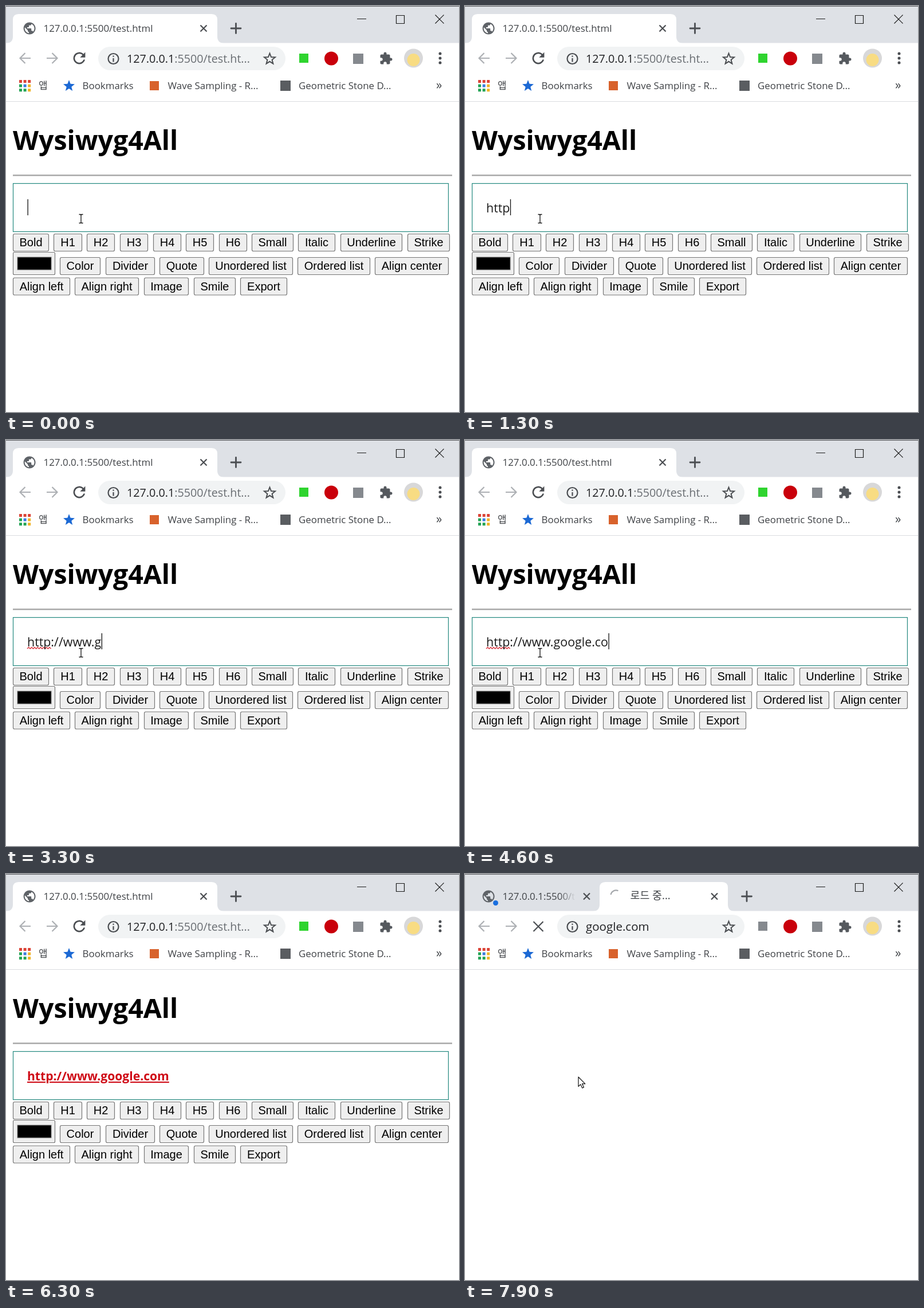
Recreate the animation shown at these times as an HTML page. Size 791 by 708 pixels, loop 8 s.

```html
<!DOCTYPE html>
<html lang="ko">
<head>
<meta charset="utf-8">
<style>
html, body { margin: 0; width: 100%; height: 100%; overflow: hidden; background: #fff; }
svg { display: block; width: 791px; height: 708px; font-family: "Open Sans", "Noto Sans", "Noto Sans CJK KR", "Noto Sans CJK", sans-serif; }
.ui { font-size: 16.9px; fill: #3f4246; }
.url { font-size: 19.7px; fill: #202124; }
.edit { font-size: 21.4px; fill: #1c1c1c; white-space: pre; }
.link { font-size: 21.1px; font-weight: 700; fill: #cf0a16; text-decoration: underline; }
.btn { font: 20px "Liberation Sans", Arial, sans-serif; text-anchor: middle; }
.line { fill: none; stroke: #4b4e52; stroke-width: 2.2; }
.cursor { fill: #fff; stroke: #111; stroke-width: 1.2; stroke-linejoin: round; }
</style>
</head>
<body>
<svg id="stage" viewBox="0 0 791 708">
  <defs>
    <linearGradient id="fade" gradientUnits="userSpaceOnUse" x1="165" x2="193">
      <stop stop-color="#3f4246"/><stop offset="1" stop-color="#3f4246" stop-opacity="0"/>
    </linearGradient>
    <path id="globe" fill="#5f6368" transform="translate(28.5 26.5) scale(1.05)" d="M12 2C6.48 2 2 6.48 2 12s4.48 10 10 10 10-4.48 10-10S17.52 2 12 2zm-1 17.93c-3.95-.49-7-3.85-7-7.93 0-.62.08-1.21.21-1.79L9 15v1c0 1.1.9 2 2 2v1.93zm6.9-2.54c-.26-.81-1-1.39-1.9-1.39h-1v-3c0-.55-.45-1-1-1H8v-2h2c.55 0 1-.45 1-1V7h2c1.1 0 2-.9 2-2v-.41c2.93 1.19 5 4.06 5 7.41 0 2.08-.8 3.97-2.1 5.39z"/>
  </defs>
  <rect width="791" height="708" fill="#fff"/>
  <rect width="791" height="64.5" fill="#dee1e6"/>
  <rect width="791" height="1" fill="#5c5e61"/>
  <path d="M613 22.5h16M681.5 16.5h14v14h-14zM749.5 15.5l15 15m0-15l-15 15" fill="none" stroke="#1c1c1c" stroke-width="1.2"/>
  <rect x="161" y="71" width="327" height="41" rx="20.5" fill="#f1f3f4"/>
  <path class="line" style="stroke:#adb0b4" d="M43 91H25m8.5-9l-9 9 9 9M71 91h18m-8.5-9l9 9-9 9"/>
  <circle class="line" cx="187.5" cy="92" r="9"/>
  <path class="line" d="M187.5 86.5v2.3m0 2.2v6.5"/>
  <rect x="0" y="166" width="791" height="1" fill="#dadce0"/>

  <!-- toolbar and bookmarks -->
  <g id="bar">
    <circle cx="568" cy="91.5" r="12" fill="#c9000b"/>
    <rect x="606" y="83" width="18" height="18" fill="#85898e"/>
    <path fill="#55595e" transform="translate(651.5 79.5)" d="M20.5 11H19V7c0-1.1-.9-2-2-2h-4V3.5a2.5 2.5 0 0 0-5 0V5H4c-1.1 0-2 .9-2 2v3.8h1.5a2.7 2.7 0 0 1 0 5.4H2V20c0 1.1.9 2 2 2h3.8v-1.5a2.7 2.7 0 0 1 5.4 0V22H17c1.1 0 2-.9 2-2v-4h1.5a2.5 2.5 0 0 0 0-5z"/>
    <circle cx="711.5" cy="91" r="16.5" fill="#d8d8d9"/>
    <circle cx="711.5" cy="94" r="11" fill="#f8dc83"/>
    <path d="M758 83v0m0 8v0m0 8v0" stroke="#4b4e52" stroke-width="5" stroke-linecap="round"/>
    <rect x="251" y="131" width="16" height="16" fill="#d8622c"/>
    <rect x="479" y="130" width="18" height="18" fill="#5a5d61"/>
    <text class="ui" x="57" y="144.5">앱</text>
    <text class="ui" x="133.5" y="145">Bookmarks</text>
    <text class="ui" x="282.5" y="145">Wave Sampling - R...</text>
    <text class="ui" x="511" y="145">Geometric Stone D...</text>
    <text class="ui" x="751" y="145" style="font-size:21px">»</text>
  </g>

  <g id="home">
    <path id="homeTab" fill="#fff"/>
    <use href="#globe"/>
    <text class="ui" x="65.5" y="45">127.0.0.1:5500/test.html</text>
    <path class="line" d="M339.5 33.5l11 11m0-11l-11 11"/>
    <path class="line" stroke-linecap="round" style="stroke-width:2.8" d="M393 39h17m-8.5-8.5v17"/>
    <path fill="#4b4e52" transform="translate(112.4 75.4) scale(1.3)" d="M17.65 6.35A8 8 0 1 0 19.73 14h-2.08A6 6 0 1 1 12 6c1.66 0 3.14.69 4.22 1.78L13 11h7V4z"/>
    <text class="url" x="211" y="99">127.0.0.1<tspan fill="#6a6e73">:5500/test.ht...</tspan></text>
    <rect x="512" y="83" width="16" height="16" fill="#2fd42f"/>
    <text x="12" y="250.5" font-size="46.5" font-weight="700">Wysiwyg4All</text>
    <path d="M12 295h767" stroke="#8e8e8e" stroke-width="1.4"/>
    <path d="M12 296.5h767" stroke="#d0d0d0"/>
    <rect x="12.5" y="309.5" width="760" height="84" fill="#fff" stroke="#23897f" stroke-width="1.2"/>
    <g id="buttons"></g>
    <rect x="12.5" y="429.5" width="73" height="39" rx="2" fill="#efefef" stroke="#767676" stroke-width="1.2"/>
    <rect x="20" y="438" width="59" height="22" stroke="#767676"/>
    <path id="squiggle" fill="none" stroke="#d8323c" stroke-width="1.4"/>
    <text class="edit" id="typed" x="37" y="360"></text>
    <rect id="caret" y="337" width="1.3" height="28" fill="#111"/>
    <text class="link" id="link" x="37" y="360">http://www.google.com</text>
  </g>

  <g id="load">
    <path id="loadTab" fill="#fff"/>
    <use href="#globe"/>
    <circle cx="53.5" cy="50.5" r="4.5" fill="#1a6fdf"/>
    <text class="ui" x="65.5" y="45" style="fill:url(#fade)">127.0.0.1:5500/t</text>
    <path id="spinner" class="line" style="stroke:#a4a7ab" d="M254.5 36A9.5 9.5 0 0 1 267.5 29.2"/>
    <text class="ui" x="288.5" y="44" style="font-size:18.4px">로드 중...</text>
    <path class="line" d="M207 33.5l11 11m0-11l-11 11M430 33.5l11 11m0-11l-11 11M119.5 83l17 17m0-17l-17 17"/>
    <path class="line" stroke-linecap="round" style="stroke-width:2.8" d="M483.5 39h17m-8.5-8.5v17"/>
    <text class="url" x="211" y="99" style="font-size:20.5px">google.com</text>
    <rect x="512" y="83" width="16" height="16" fill="#85898e"/>
  </g>

  <g id="ibeam"><path d="M-3.5-7.5h2.5l1 1 1-1h2.5M0-6.5v13M-3.5 7.5h2.5l1-1 1 1h2.5" fill="none" stroke="#111" stroke-width="1.3"/></g>
  <g id="arrow"><path class="cursor" d="M0 0v16.5l3.8-3.6 3 6.3 2.7-1.3-2.9-6h5.2z"/></g>
  <g id="hand"><path class="cursor" d="M-2 14V2q0-2 2-2t2 2v6q0-1.5 1.7-1.3T5.5 8.500q.3-1.3 1.9-1t1.6 2q2-1 2.3 1v5q0 3.5-2.500 5.500v2.500H-1v-2.500L-6.500 14q-1-2.500 1.300-2.500 1.500.3 3.200 2.500M2 8v5M5.500 8.500V13M9 9.500V13"/></g>
</svg>
<script>
const $ = id => document.getElementById(id);
const show = (id, on) => $(id).style.display = on ? "" : "none";
const add = (id, markup) => $(id).insertAdjacentHTML("beforeend", markup);

const tabPath = (a, b) =>
  `M${a - 12} 65q12 0 12-12V24q0-10 10-10H${b - 10}q10 0 10 10V53q0 12 12 12z`;
$("homeTab").setAttribute("d", tabPath(12, 369));
$("loadTab").setAttribute("d", tabPath(235, 459));

function star(x, y, r, style) {
  const pts = Array.from({ length: 10 }, (_, i) => {
    const a = (i * 36 - 90) * Math.PI / 180, d = i % 2 ? r * 0.43 : r;
    return [x + d * Math.cos(a), y + d * Math.sin(a)];
  });
  add("bar", `<polygon points="${pts}" ${style}/>`);
}
star(460.5, 92.5, 10, 'fill="none" stroke="#4b4e52" stroke-width="2"');
star(110, 139.5, 10.5, 'fill="#1c69d4"');

const [red, green, blue, yellow] = ["#db4437", "#23a455", "#3b7de0", "#f0b429"];
[red, red, red, green, blue, yellow, green, green, yellow].forEach((c, i) =>
  add("bar", `<rect x="${23 + i % 3 * 7.6}" y="${129 + (i / 3 | 0) * 7.6}" width="5" height="5" fill="${c}"/>`));

// Each button: label, left edge, right edge
const rows = [
  [397, "Bold,12,75 H1,83,133 H2,141,190 H3,199,248 H4,257,306 H5,314,363 H6,372,421 Small,429,502 Italic,510,575 Underline,584,692 Strike,701,775"],
  [438, "Color,94,165 Divider,174,260 Quote,268,346 Unordered_list,354,501 Ordered_list,509,636 Align_center,644,773"],
  [473.5, "Align_left,12,112 Align_right,120,232 Image,241,319 Smile,328,401 Export,409,491"]
];
for (const [y, row] of rows)
  for (const spec of row.split(" ")) {
    const [label, a, b] = spec.split(",");
    add("buttons", `<rect x="${+a + .5}" y="${y + .5}" width="${b - a - 1}" height="30" rx="2.5" fill="#efefef" stroke="#767676" stroke-width="1.2"/>
      <text class="btn" x="${(+a + +b) / 2}" y="${y + 22}">${label.replace("_", " ")}</text>`);
  }

let zigzag = "M37 364";
for (let i = 1; i <= 16; i++) zigzag += `L${37 + i * 2.6} ${i % 2 ? 361.5 : 364}`;
$("squiggle").setAttribute("d", zigzag);

const address = "http://www.google.com";
const typing = [[0, 0], [400, 0], [1250, 4], [3250, 12], [4550, 20], [4800, 21], [8000, 21]];
const linkAt = 5400, enterAt = 6500, arriveAt = 7000, loadAt = 7500;

function typedCount(t) {
  const i = typing.findIndex(k => k[0] > t);
  const [t0, n0] = typing[i - 1], [t1, n1] = typing[i];
  return Math.floor(n0 + (n1 - n0) * (t - t0) / (t1 - t0));
}

function pointer(t) {
  if (t < linkAt) return ["ibeam", 131, 371];
  if (t < enterAt) return [];
  if (t >= loadAt) return ["arrow", 198, 354];
  const p = Math.min(1, (t - enterAt) / (arriveAt - enterAt));
  const left = (1 - p) ** 2;
  const x = 208 + 571 * left, y = 363 + 305 * left;
  return [y > 394 ? "arrow" : x > 285 ? "ibeam" : "hand", x, y];
}

function draw(t) {
  const loading = t >= loadAt, linked = t >= linkAt, n = typedCount(t);
  show("home", !loading);
  show("load", loading);
  show("typed", !linked);
  show("link", linked);
  show("squiggle", n > 4 && !linked);
  $("typed").textContent = address.slice(0, n);

  const idle = n === 0 ? t : n === address.length ? t - 4800 : 0;
  show("caret", !linked && idle % 1000 < 500);
  if (!loading && !linked)
    $("caret").setAttribute("x", 37.5 + (n ? $("typed").getComputedTextLength() : 0));

  $("spinner").setAttribute("transform", `rotate(${(7900 - t) * -0.3} 264 38)`);

  const [kind, x, y] = pointer(t);
  for (const id of ["ibeam", "arrow", "hand"]) show(id, id === kind);
  if (kind) $(kind).setAttribute("transform", `translate(${x} ${y})`);
}

const start = performance.now();
function frame() {
  const t = (performance.now() - start) % 8000;
  draw(Math.floor(t / 100) * 100);
  requestAnimationFrame(frame);
}
frame();
</script>
</body>
</html>
```
